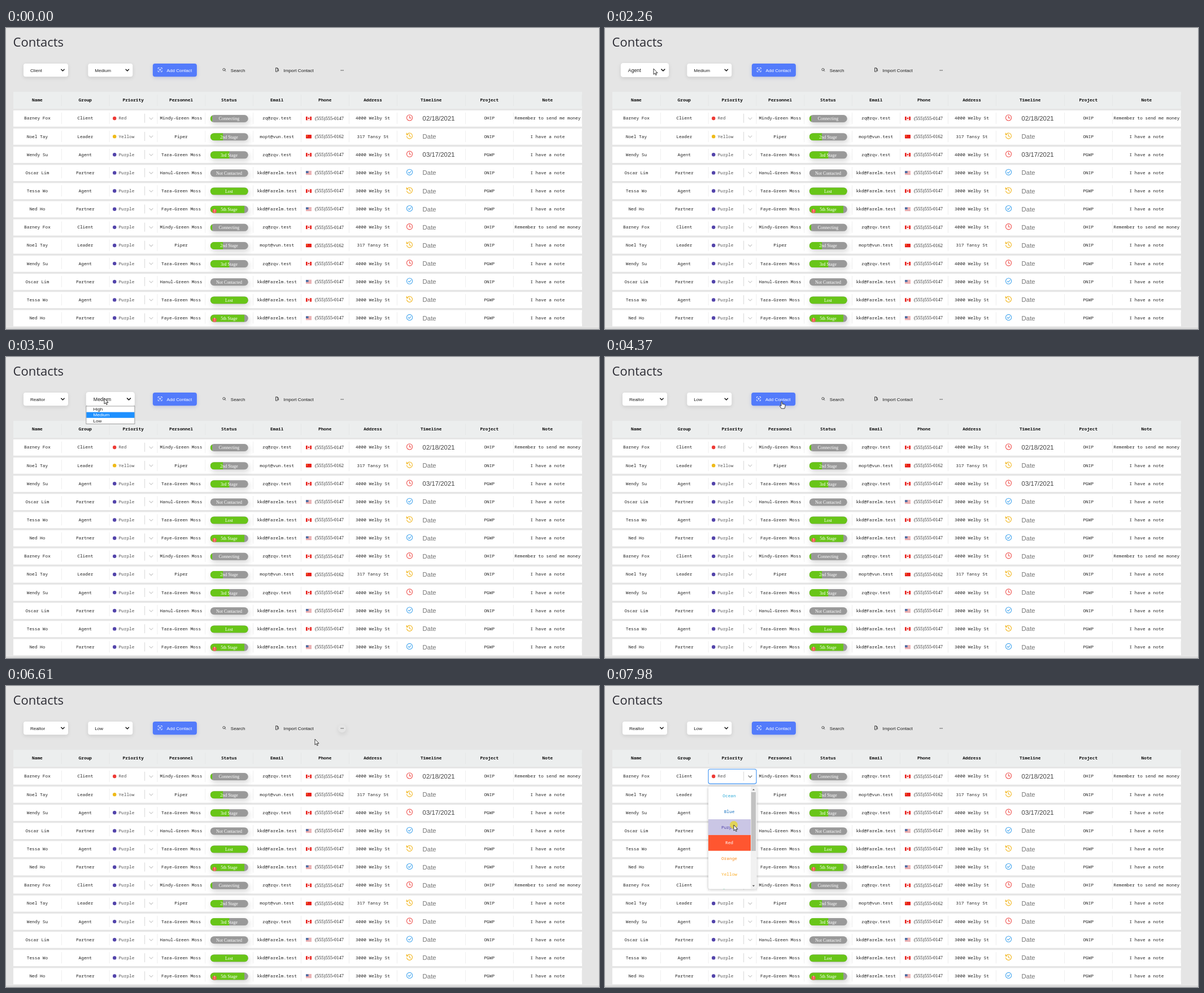
Write an HTML page that moves like this. It is 1050 px wide and 533 px high and loops after 8000 ms.

```html
<!DOCTYPE html>
<html lang="en">
<head>
<meta charset="utf-8">
<title>Contacts</title>
<style>
html, body { margin: 0; width: 100%; height: 100%; overflow: hidden; background: #e5e5e5; }
svg { display: block; width: 100vw; height: 100vh; }
text { white-space: pre; }
.mono { font: 7.8px "Noto Sans Mono", "DejaVu Sans Mono", monospace; fill: #222; }
.head { font-weight: 700; fill: #111; }
.sans { font: 8.1px "Liberation Sans", Arial, sans-serif; fill: #1c1c1c; }
.date { font-size: 11.4px; }
.serif { font: 8.5px "Liberation Serif", Times, serif; fill: #222; }
.pill { font-size: 7.9px; fill: #fff; }
.title { font: 22px "Open Sans", "Noto Sans", sans-serif; fill: #2b2b33; }
.mid { text-anchor: middle; }
.line { fill: none; stroke-linecap: round; stroke-linejoin: round; }
.card { filter: drop-shadow(0 2px 3px rgba(0,0,0,.11)); }
.blue { filter: drop-shadow(0 2px 3px rgba(70,90,190,.22)); }
.soft { filter: drop-shadow(1px 3px 4px rgba(0,0,0,.17)); }
.wide { filter: drop-shadow(2px 4px 5px rgba(0,0,0,.16)); }
.menu { filter: drop-shadow(0 1.5px 2.5px rgba(0,0,0,.25)); }
</style>
</head>
<body>
<svg viewBox="0 0 1050 533" preserveAspectRatio="none">
  <defs><clipPath id="menuClip"><rect x="183" y="178" width="85.5" height="181.5" rx="3"/></clipPath></defs>
  <g id="base"></g>
  <g id="live"></g>
</svg>
<script>
const LOOP = 8000, TICK = 77.5, FIRST_TICK = 70;
const ROW = 32.14, COL = 84.87, WIDE = 121.4;
const HEADS = ['Name', 'Group', 'Priority', 'Personnel', 'Status', 'Email', 'Phone', 'Address', 'Timeline', 'Project', 'Note'];
const RED = '#ee3a35', YELLOW = '#efba18', PURPLE = '#5243aa';

const STATUS = {
  'Connecting': .05, '2nd Stage': 1 / 3, '3rd Stage': .5, 'Not Contacted': 0, 'Lost': 1, '5th Stage': .9
};
const MAIL = { a: 'zq@zqv.test', b: 'mopt@vun.test', c: 'kkd@Farelm.test' };
const ROADS = { a: '4000 Welby St', b: '317 Tansy St', c: '3000 Welby St' };
// name, group, personnel, status, contact set, flag, icon, project
const PEOPLE = [
  ['Barney Fox', 'Client', 'Mindy-Green Moss', 'Connecting', 'a', 'ca', 'clock', 'OHIP'],
  ['Noel Tay', 'Leader', 'Piper', '2nd Stage', 'b', 'cn', 'history', 'ONIP'],
  ['Wendy Su', 'Agent', 'Tara-Green Moss', '3rd Stage', 'a', 'ca', 'clock', 'PGWP'],
  ['Oscar Lim', 'Partner', 'Hanul-Green Moss', 'Not Contacted', 'c', 'us', 'check', 'ONIP'],
  ['Tessa Wo', 'Agent', 'Tara-Green Moss', 'Lost', 'c', 'ca', 'history', 'PGWP'],
  ['Ned Ho', 'Partner', 'Faye-Green Moss', '5th Stage', 'c', 'us', 'check', 'PGWP']
];
const ICONS = {
  clock: ['#ef5552', '<circle r="5.1"/><path d="M0-3V.5H2.6"/>'],
  history: ['#f2b51c', '<path d="M-4.5-2.3A5 5 0 1 1-5 .8M-5.3-5V-2.1H-2.4M0-2.6V.4L2 1.6"/>'],
  check: ['#43a5ee', '<circle r="5.1"/><path d="M-2.3.2L-.7 1.8 2.4-1.4"/>']
};

const text = (x, y, s, cls, extra = '') => `<text x="${x}" y="${y}" class="${cls}" ${extra}>${s}</text>`;
const rect = (x, y, w, h, fill, extra = '') => `<rect x="${x}" y="${y}" width="${w}" height="${h}" fill="${fill}" ${extra}/>`;
const dot = (x, y, r, fill, extra = '') => `<circle cx="${x}" cy="${y}" r="${r}" fill="${fill}" ${extra}/>`;
const line = (d, stroke, w = 1) => `<path class="line" d="${d}" stroke="${stroke}" stroke-width="${w}"/>`;
const chevron = (x, y, r, stroke, w) => line(`M${x - r} ${y - r / 2}l${r} ${r} ${r}-${r}`, stroke, w);

const isWide = i => i === 8 || i === 10;
const width = i => isWide(i) ? WIDE : COL;
const left = i => 13 + i * COL + (WIDE - COL) * ((i > 8) + (i > 10));
const mid = i => left(i) + width(i) / 2;

function flag(kind, x, y) {
  const red = '#e8201c';
  if (kind === 'cn') return rect(x, y, 10, 6.4, red, 'rx=".6"') + dot(x + 2.2, y + 2, .9, '#f3c623');
  if (kind === 'ca') return rect(x, y, 10, 6.4, red) + rect(x + 2.7, y, 4.6, 6.4, '#fff') + dot(x + 5, y + 3.1, 1.4, red);
  let s = rect(x, y, 10, 6.4, '#fff');
  for (let i = 0; i < 4; i++) s += rect(x, y + i * 1.83, 10, .91, '#d9686c');
  return s + rect(x, y, 4.6, 3.6, '#4a70a8');
}

function pill(label, y) {
  const x = 361.8, w = 67, h = 13, top = y - h / 2, id = 'p' + Math.round(y);
  let s = `<clipPath id="${id}"><rect x="${x}" y="${top}" width="${w}" height="${h}" rx="6.5"/></clipPath>`;
  s += rect(x, top, w, h, '#999', 'rx="6.5" class="wide"');
  s += rect(x, top, w * STATUS[label], h, '#68c518', `clip-path="url(#${id})"`);
  s += text(395, y + 2.9, label, 'serif pill mid');
  if (label === '5th Stage') s += dot(369.2, y + 2.9, 3.6, '#f25a55') + text(369.2, y + 5.3, '!', 'serif pill mid', 'font-weight="700"');
  return s;
}

function priority(y, name, color, arrow = '#ccc') {
  return dot(192.2, y + .2, 3.2, color) + text(199.4, y + 2.6, name, 'mono', 'style="fill:#555"') +
    rect(245.3, y - 8, .8, 16, '#ccc') + chevron(257, y + .5, 3, arrow, 1.2);
}

function tableRow(i) {
  const [name, group, staff, status, set, country, icon, project] = PEOPLE[i % 6];
  const y = 159.8 + i * ROW;
  let s = rect(13, y - 13.9, 1007, 28.7, '#fff');
  const note = i % 6 ? 'I have a note' : 'Remember to send me money';
  const cells = [name, group, '', staff, '', MAIL[set], '', ROADS[set], '', project, note];
  cells.forEach((str, c) => {
    s += rect(left(c + 1), y - 10, .7, 20, '#e6e6e6') + text(mid(c), y + 2.6, str, 'mono mid');
  });
  s += priority(y, ...([['Red', RED], ['Yellow', YELLOW]][i] || ['Purple', PURPLE]));
  s += pill(status, y + .7);
  s += flag(country, 531, y - 2.9) + text(547, y + 2.9, set === 'b' ? '(555)555-0162' : '(555)555-0147', 'serif');
  const [tone, shape] = ICONS[icon];
  s += `<g class="line" transform="translate(714.6 ${y - .9})" stroke="${tone}" stroke-width="1.1">${shape}</g>`;
  const day = { 0: '02/18/2021', 2: '03/17/2021' }[i];
  return s + text(737.6, y + 4.2, day || 'Date', 'sans date', `style="fill:${day ? '#444' : '#757575'}"`);
}

function page() {
  let s = text(12.6, 33, 'Contacts', 'title') + rect(13, 113, 1007, 30, '#eceeee');
  HEADS.forEach((h, i) => s += text(mid(i), 130.4, h, 'mono head mid') + rect(left(i + 1), 118, .7, 20, '#e2e4e4'));
  for (let i = 0; i < 12; i++) s += tableRow(i);
  return s + rect(0, 531.3, 1050, 1, '#bcbcbc') + rect(0, 532.3, 1050, 1, '#efefef');
}

// Pointer gestures: begin, end, x, y
const ENTER = [742, 334];
const MOVES = [
  [70, 225, 309, 129],
  [440, 1000, 86, 76],
  [1700, 1780, 80, 107],
  [1950, 2235, 86, 72],
  [2400, 2640, 73, 104],
  [2950, 3475, 174, 73],
  [3560, 3730, 170, 109],
  [3800, 4330, 313, 79],
  [4500, 5100, 430, 72],
  [5420, 6110, 591, 71],
  [6510, 6570, 547, 94],
  [6590, 7100, 253, 154],
  [7610, 7970, 228, 246]
];
// Hover zones along the toolbar: x, width
const ZONES = { group: [31, 79], level: [145.3, 79], add: [260, 78], search: [371, 66], load: [464, 94], more: [585, 20] };
const BUTTONS = ['add', 'search', 'load', 'more'];
const GROUPS = ['Client', 'Realtor', 'Agent'], LEVELS = ['High', 'Medium', 'Low'];
// Open lists: zone, from, to, items, selected item
const LISTS = [
  ['group', 1160, 1950, GROUPS, 0],
  ['group', 2400, 2950, GROUPS, 2],
  ['level', 3420, 3790, LEVELS, 1]
];
const MENU_OPENS = 7350, PRESS = 7950;
const COLORS = [['Ocean', '#2aa9d6'], ['Blue', '#1470c0'], ['Purple', PURPLE], ['Red', '#ff5630'],
  ['Orange', '#f88b1a'], ['Yellow', '#faae2c'], ['Green', '#36b37e']];

const clamp = v => Math.max(0, Math.min(1, v));
const ease = k => k * k * (3 - 2 * k);
const snap = t => t < FIRST_TICK ? 0 : FIRST_TICK + Math.floor((t - FIRST_TICK) / TICK) * TICK;
const openList = t => LISTS.find(([, a, b]) => t >= a && t < b);

function tip(t) {
  let [x, y] = ENTER;
  for (const [a, b, nx, ny] of MOVES) {
    const k = ease(clamp((t - a) / (b - a)));
    x += (nx - x) * k;
    y += (ny - y) * k;
  }
  return [x, y];
}

function inside(t, key) {
  const list = openList(t);
  if (list) return list[0] === key;
  const [x, y] = tip(t), [zx, w] = ZONES[key];
  return x >= zx && x < zx + w && y > 63 && y < 87;
}

// Share of the last 160 ms spent over a zone
function hover(t, key) {
  let n = 0;
  for (let i = 0; i < 8; i++) n += inside(t - i * 20, key);
  return n / 8;
}

function select(key, label, grow) {
  const [x, w] = ZONES[key], cx = x + w / 2;
  return `<g transform="translate(${cx} 74.6) scale(${1 + .09 * grow}) translate(${-cx} -74.6)">` +
    rect(x, 63, w, 23.2, '#fff', 'rx="4" class="card"') +
    text(x + 12, 77.5, label, 'sans') + chevron(x + 69.5, 74.6, 2.7, '#111', 1.4) + '</g>';
}

const ghost = (key, k) => k > 0 ? rect(ZONES[key][0], 63.2, ZONES[key][1], 23.4, '#e5e5e5', `rx="4" class="soft" opacity="${k}"`) : '';
const shift = (k, inner) => `<g transform="translate(${-.7 * k} 0)">${inner}</g>`;

function toolbar(t) {
  const label = t < 1950 ? 'Client' : t < 2950 ? 'Agent' : 'Realtor';
  const [add, find, load, more] = BUTTONS.map(key => hover(t, key));
  let s = select('group', label, hover(t, 'group')) + select('level', t < 3790 ? 'Medium' : 'Low', hover(t, 'level'));
  s += shift(add, rect(259.9, 63, 78, 23.3, '#537bfb', 'rx="4" class="blue"') +
    line('M269.3 72.5v-2h2M274.2 70.5h2v2M276.2 75.5v2h-2M271.3 77.5h-2v-2M271.2 74h3.2M272.8 72.4v3.2', '#fff', .8) +
    text(284.6, 78, 'Add Contact', 'sans', 'style="fill:#fff"'));
  s += ghost('search', find) + shift(find, '<circle class="line" cx="386" cy="73.6" r="2.1" stroke="#333" stroke-width=".8"/>' +
    line('M387.6 75.2l1.4 1.4', '#333', .8) + text(397.8, 78, 'Search', 'sans'));
  s += ghost('load', load) + shift(load, line('M480.4 77.3h-2.9v-6.6h2.9l1.9 1.9v1.2M480.2 70.9v2h2M479.8 75.4h3M481.6 74.2l1.2 1.2-1.2 1.2', '#222', .8) +
    text(491.6, 78, 'Import Contact', 'sans'));
  if (more > 0) s += dot(595, 75.4, 7, '#e5e5e5', `class="soft" opacity="${more}"`);
  return s + [-2, 0, 2].map(d => dot(595.2 + d, 75, .65, '#333')).join('');
}

function list(t, y) {
  const open = openList(t);
  if (!open) return '';
  const [key, , , items, picked] = open;
  const x = ZONES[key][0] - 3.4, top = 87.4, h = 10.2;
  const active = y < top ? picked : Math.min(2, Math.floor((y - top) / h));
  let s = rect(x, top - .4, 86, 3 * h + .8, '#fff', 'stroke="#888" stroke-width=".8"');
  items.forEach((item, i) => {
    if (i === active) s += rect(x + .4, top + i * h, 85.2, h, '#1e90ff');
    s += text(x + 12.6, top + i * h + 7.8, item, 'sans', i === active ? 'style="fill:#fff"' : '');
  });
  return s;
}

function colorMenu(t, y) {
  if (t < MENU_OPENS) return '';
  const ring = clamp((t - MENU_OPENS) / 80), top = 180.2, h = 27.9;
  let s = rect(183, 147.3, 85, 25.8, '#fff', `rx="3" stroke="#3d93f5" stroke-width="1.1" stroke-opacity="${ring}"`);
  s += priority(159.8, 'Red', RED, '#666');
  s += rect(183, 178, 85.5, 181.5, '#fff', 'rx="3" class="menu"') + '<g clip-path="url(#menuClip)">';
  const over = Math.floor((y - top) / h);
  COLORS.forEach(([name, tone], i) => {
    const picked = name === 'Red', tint = picked ? 1 : i !== over ? 0 : t > PRESS ? .3 : .1;
    s += rect(183, top + i * h, 75, h, tone, `opacity="${tint}"`);
    s += text(220, top + i * h + 16.5, name, 'mono mid', `style="fill:${picked ? '#fff' : tone}"`);
  });
  s += rect(258, 178, 10.5, 182, '#f1f1f1') + rect(258.8, 188, 8.2, 104, '#c1c1c1');
  return s + '<path d="M260.8 184.6h4.4l-2.2-2.4zM260.8 352.8h4.4l-2.2 2.4z" fill="#555"/></g>';
}

function pointer(t, x, y) {
  if (t < FIRST_TICK) return '';
  const d = BUTTONS.some(key => inside(t, key))
    ? 'M-1 .6Q0-.6 1 .6V4.2L5.2 5Q6 5.3 6 6.2V9L5 12.2H-.8L-3.6 7.8Q-3.4 6.2-1 7.6Z'
    : 'M0 0V10.2L2.3 8.1 3.9 11.5 5.4 10.8 3.9 7.5H7Z';
  const glow = t > PRESS ? dot(x, y, 7, '#e6d634', 'opacity=".8"') : '';
  return glow + `<path d="${d}" transform="translate(${x} ${y})" fill="#fff" stroke="#222" stroke-width=".9" stroke-linejoin="round"/>`;
}

const live = document.getElementById('live');
document.getElementById('base').innerHTML = page();
let shown = -1;

function draw(now) {
  const t = snap(now % LOOP);
  if (t === shown) return;
  shown = t;
  const [x, y] = tip(t);
  live.innerHTML = toolbar(t) + list(t, y) + colorMenu(t, y) + pointer(t, x, y);
}

const start = performance.now();
function run() {
  draw(performance.now() - start);
  requestAnimationFrame(run);
}
run();
</script>
</body>
</html>
```
